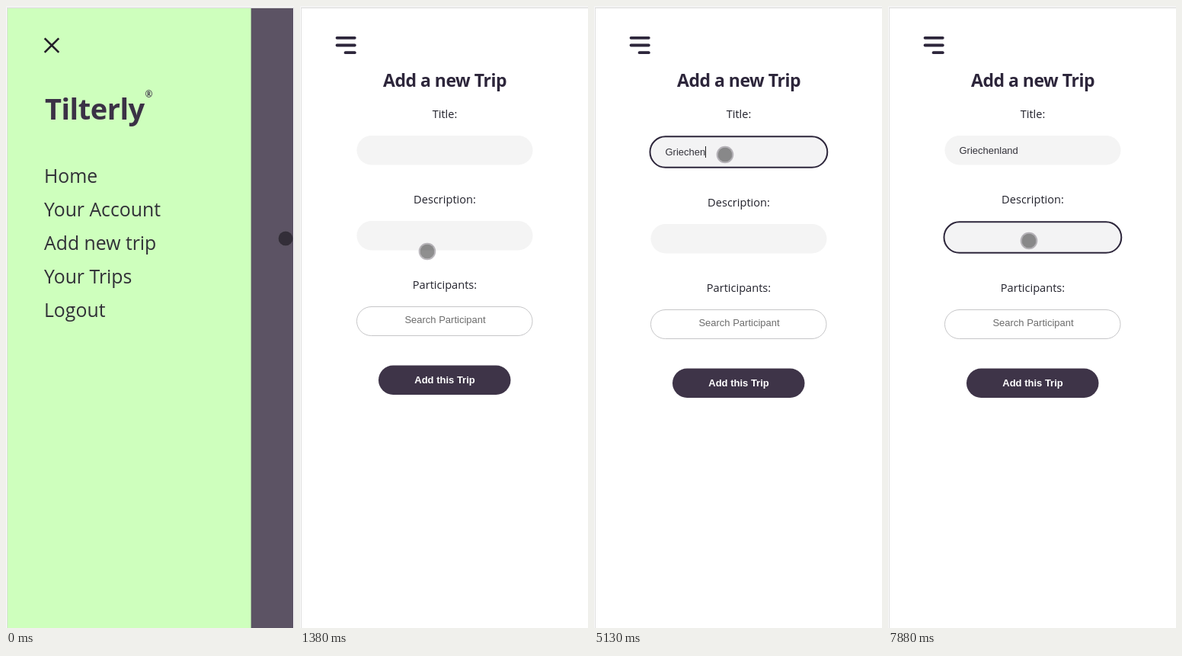
An HTML page with a canvas for the animation above (8 s loop, 378 px wide and 816 px high).

```html
<!DOCTYPE html>
<html lang="en">
<head>
<meta charset="utf-8">
<title>Add a trip</title>
<style>
html, body { margin: 0; width: 100%; height: 100%; overflow: hidden; background: #fff; }
canvas { display: block; width: 378px; height: 816px; }
</style>
</head>
<body>
<canvas id="stage" width="378" height="816"></canvas>
<script>
const ctx = document.getElementById('stage').getContext('2d');
const LOOP = 8000, STEP = 125, BLINK = 500;
const ARROW_AT = 1250, FORM_AT = 1375, TITLE_AT = 2500, DESC_AT = 7375;
const DARK = '#2d263b', PURPLE = '#3e3448';
const UI = '"Open Sans", "Noto Sans", sans-serif';
const FIELD_FONT = '13px "Liberation Sans", Arial, sans-serif';
const WORD = 'Griechenland';

// Resting places of the pointer
const EDGE = { x: 367, y: 305 }, LINK = { x: 167, y: 322 };
const TITLE = { x: 172, y: 195 }, DESC = { x: 185, y: 308 };

function text(str, x, y, font, color, align = 'left', spacing = 0) {
  ctx.font = font;
  ctx.fillStyle = color;
  ctx.textAlign = align;
  ctx.letterSpacing = spacing + 'px';
  ctx.fillText(str, x, y);
}

function rect(x, y, w, h, color) {
  ctx.fillStyle = color;
  ctx.fillRect(x, y, w, h);
}

function pill(x, y, w, h, fill, stroke, line) {
  ctx.beginPath();
  ctx.roundRect(x, y, w, h, h / 2);
  ctx.fillStyle = fill;
  ctx.fill();
  if (stroke) {
    ctx.strokeStyle = stroke;
    ctx.lineWidth = line;
    ctx.stroke();
  }
}

function line(x1, y1, x2, y2, width, color, cap = 'butt') {
  ctx.beginPath();
  ctx.moveTo(x1, y1);
  ctx.lineTo(x2, y2);
  ctx.strokeStyle = color;
  ctx.lineWidth = width;
  ctx.lineCap = cap;
  ctx.stroke();
}

const progress = (t, from, to) => Math.min(1, Math.max(0, (t - from) / (to - from)));
const ease = k => k * k * (3 - 2 * k);
const mix = (a, b, k) => ({ x: a.x + (b.x - a.x) * k, y: a.y + (b.y - a.y) * k });

function bezier(a, b, c, d, k) {
  const ab = mix(a, b, k), bc = mix(b, c, k), cd = mix(c, d, k);
  return mix(mix(ab, bc, k), mix(bc, cd, k), k);
}

function pointerAt(t) {
  if (t < FORM_AT) {
    return bezier(EDGE, { x: 100, y: 275 }, { x: 0, y: 420 }, LINK, progress(t, 250, 1125));
  }
  const atTitle = mix(LINK, TITLE, ease(progress(t, 1750, 2375)));
  return mix(atTitle, DESC, ease(progress(t, 6250, 7000)));
}

function touch(t) {
  const { x, y } = pointerAt(t);
  ctx.beginPath();
  ctx.arc(x, y, 9.5, 0, Math.PI * 2);
  ctx.fillStyle = 'rgba(0,0,0,.44)';
  ctx.fill();
  ctx.beginPath();
  ctx.arc(x, y, 10.4, 0, Math.PI * 2);
  ctx.strokeStyle = 'rgba(92,86,98,.42)';
  ctx.lineWidth = 1.8;
  ctx.stroke();
}

function arrow(x, y) {
  ctx.save();
  ctx.translate(x, y);
  const shape = new Path2D('M0 0V15.5L3.6 12.2L6 18L8.6 17L6.2 11.3H11Z');
  ctx.fillStyle = '#fff';
  ctx.fill(shape);
  ctx.strokeStyle = '#222';
  ctx.lineWidth = 1;
  ctx.stroke(shape);
  ctx.restore();
}

function frame() {
  rect(0, 0, 378, 816, '#fff');
  rect(0, 0, 378, 2, '#f3f3f3');
  rect(1, 2, 377, 1, '#dcdcdc');
  rect(1, 2, 1, 814, '#dcdcdc');
}

function menu(t) {
  rect(300, 3, 77, 813, '#5c5364');
  rect(2, 3, 319.6, 813, '#ceffbd');
  for (const side of [-9.3, 9.3]) {
    line(60 - side, 42.3, 60 + side, 60.9, 2.6, '#211d27');
  }
  text('Tilterly', 51, 149, '700 38px ' + UI, '#3b3146', 'left', -0.5);
  text('®', 182.5, 120, '600 12px ' + UI, '#3b3146');
  ['Home', 'Your Account', 'Add new trip', 'Your Trips', 'Logout'].forEach((item, i) =>
    text(item, 50, 232 + i * 44, '24.8px ' + UI, '#303037'));
  if (t >= ARROW_AT) {
    arrow(156, 311);
  } else {
    touch(t);
    rect(377, 3, 1, 813, '#fff');
  }
}

// The first letter comes early, the rest follow at an even pace
const keyTime = i => i ? 3521 + 229 * i : 3250;

function typedCount(t) {
  let n = 0;
  while (n < WORD.length && keyTime(n) <= t) n++;
  return n;
}

function caret(x, y, t, since) {
  if (Math.floor((t - since) / BLINK) % 2 === 0) rect(Math.round(x), y, 1, 15, '#222');
}

function field(y, focused) {
  if (focused) pill(73.5, y + 1.3, 232.8, 40.5, '#f3f3f4', DARK, 2);
  else pill(74.5, y, 231, 38.5, '#f4f4f4');
}

function form(t) {
  const onTitle = t >= TITLE_AT && t < DESC_AT, onDesc = t >= DESC_AT;
  const descShift = onTitle ? 4 : 0;
  const shift = onTitle || onDesc ? 4 : 0;
  const label = (str, y) => text(str, 190, y, '14.6px ' + UI, '#22222c', 'center');

  for (let i = 0; i < 3; i++) {
    const y = 41.8 + i * 9.7;
    line(i < 2 ? 48.6 : 59.7, y, 71.8, y, 3.8, DARK, 'round');
  }
  text('Add a new Trip', 190, 106, '700 23px ' + UI, DARK, 'center', -0.5);

  label('Title:', 147);
  field(170, onTitle);
  const count = typedCount(t);
  const word = WORD.slice(0, count);
  text(word, 93.5, onTitle ? 196 : 194, FIELD_FONT, '#33323a');
  if (onTitle) {
    const since = count ? keyTime(count - 1) : TITLE_AT + STEP;
    caret(93.5 + ctx.measureText(word).width, 184, t, since);
  }

  label('Description:', 259 + descShift);
  field(282 + descShift, onDesc);
  if (onDesc) caret(93.5, 296, t, DESC_AT);

  label('Participants:', 371 + shift);
  pill(74.5, 394.5 + shift, 230.5, 38, '#fff', '#c6c6c8', 1);
  text('Search Participant', 190.5, 416 + shift, FIELD_FONT, '#6c6c6c', 'center');

  pill(103, 471.5 + shift, 173.5, 38.5, PURPLE);
  text('Add this Trip', 190, 495 + shift, 'bold ' + FIELD_FONT, '#fff', 'center');
  touch(t);
}

function draw(now) {
  const t = Math.floor((now % LOOP) / STEP) * STEP;
  frame();
  if (t < FORM_AT) menu(t);
  else form(t);
}

const start = performance.now();
function tick() {
  draw(performance.now() - start);
  requestAnimationFrame(tick);
}
tick();
</script>
</body>
</html>
```
